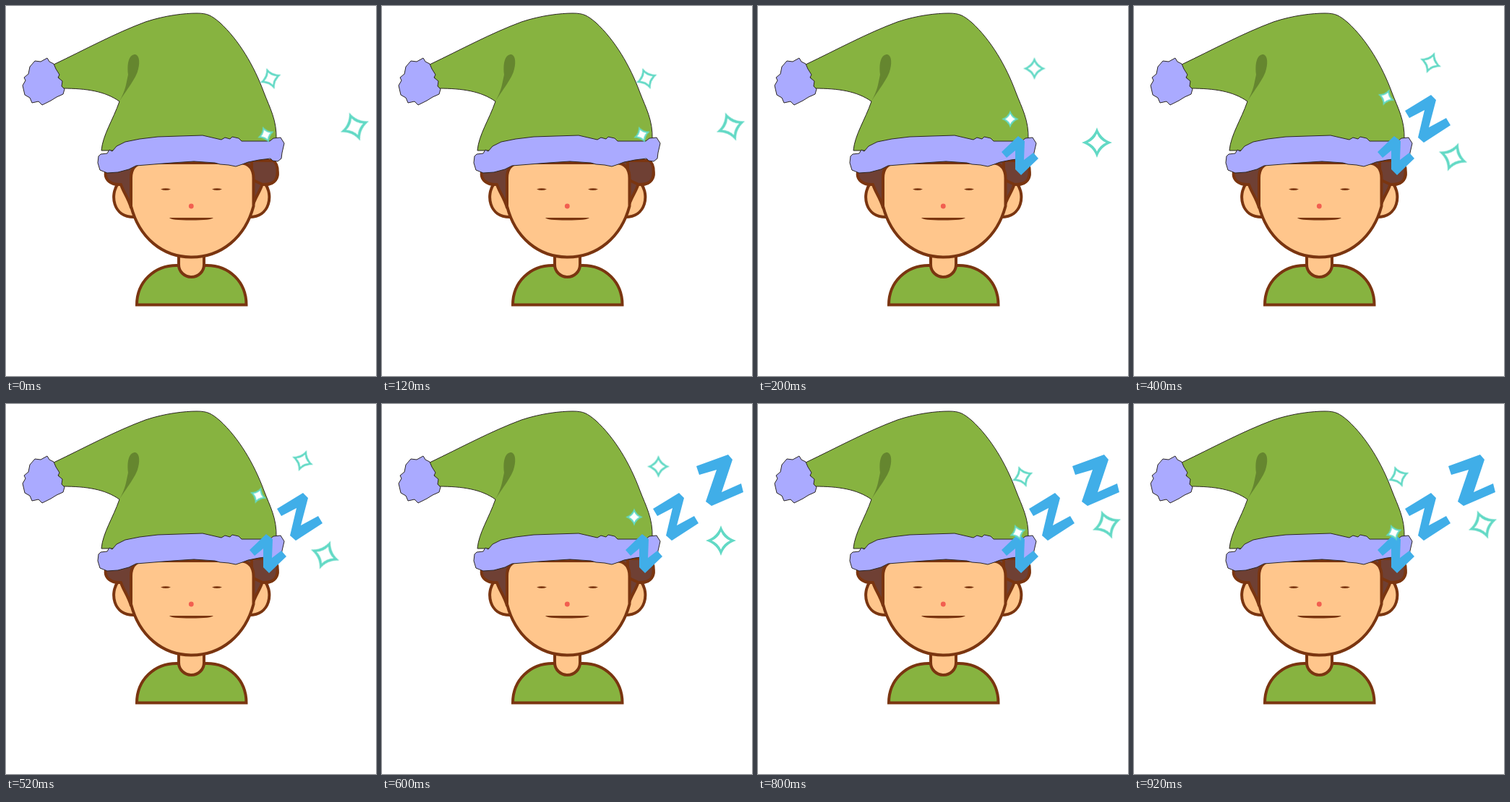
An HTML page that plays this animation: 512x512 px, repeating every 1 s.

```html
<!DOCTYPE html>
<html lang="en">
<head>
<meta charset="utf-8">
<title>Sleepy elf</title>
<style>
  html, body { margin: 0; width: 100%; height: 100%; overflow: hidden; background: #fff; }
  svg { display: block; width: 100vw; height: 100vh; }
  .line { stroke: #7a3510; stroke-width: 4; stroke-linejoin: round; }
  .skin { fill: #ffc68c; }
  .hair { fill: #6f4034; }
  .green { fill: #87b340; }
  .fur { fill: #aaaaff; }
  .thin { stroke: #2b2622; stroke-width: 1; stroke-linejoin: round; }
  .ink { fill: #7a3510; }
  .zed { fill: #40aee8; }
</style>
</head>
<body>
<svg id="stage" viewBox="0 0 512 512" xmlns="http://www.w3.org/2000/svg">
  <defs>
    <g id="side">
      <path class="skin line" d="M155 246C144 260 147 292 177 292V246Z"/>
      <path class="hair line" d="M190 214H150L138 230C136 240 145 248 159 247C162 257 169 265 173 279L190 240Z"/>
    </g>
  </defs>

  <use href="#side"/>
  <use href="#side" transform="matrix(-1 0 0 1 513.5 0)"/>
  <path class="hair line" d="M340 214H370C378 220 377 238 371 243C367 247 361 247 355 247L340 240Z"/>

  <path class="green line" style="stroke-linejoin:miter" d="M181 413.5C181 382 205 359 236 359H278C309 359 332.500 382 332.500 413.500Z"/>
  <path class="skin line" d="M239 342V358a17.500 17 0 0 0 35 0V342Z"/>
  <path class="skin line" d="M173 277V238Q173 219 190 217H325Q342.500 219 342.500 238V277C331 320 298 347.500 257 347.500S184 320 173 277Z"/>

  <path class="ink" d="M214 253.500Q221 251 228 253.500Q221 256.500 214 253.500ZM285 253.500Q292 251 299 253.500Q292 256.500 285 253.500Z"/>
  <path class="ink" d="M226 293H287Q284 296.500 256 296.500T226 293Z"/>
  <circle cx="256.300" cy="277" r="3.400" fill="#f25f50"/>

  <path class="green thin" d="M66 81C110 60 150 38 193 22C220 13 247 10 264 10C279 10 284 13 296 23C322 47 343 82 357 120C365 141 375 158 374 185V200H132C134 178 148 158 157 132C137 118 112 114 78 114Z"/>
  <path fill="#65862f" d="M156.500 132.500C166 116 166 108 169 95C167 77 171 67 179 67C186 69 185 82 182 91C178 102 170 112 156.500 132.500Z"/>
  <path class="fur thin" d="M128 208L131 205L140 204L143 199L147 201L153 194L165 188L185 184L210 181L240 180L272 179L285 182L298 185L303 182L310 184L313 181L322 183L326 187L345 187L365 187L370 183L380 182L385 190L382 203L381 211L376 215L369 214L366 211L350 213L335 216L327 219L318 222L308 220L296 219L289 217L260 215L230 217L205 219L180 221L170 226L155 230L140 231L130 227L127 217Z"/>
  <path class="fur thin" d="M57 72L60 77L66 80L69 87L74 95L72 99L78 104L77 111L81 115L79 122L70 126L62 131L50 137L45 132L36 134L33 127L26 123L23 110L27 103L25 99L31 94L33 84L40 76L48 77Z"/>

  <path class="zed" d="M337 202L360 180L369 187L368 213L381 203L388 211L364 234L356 226L356 200L344 210Z"/>
  <path class="zed" d="M375 145L411 123L418 130L408 168L432 155L438 165L401 189L393 182L402 144L381 155Z"/>
  <path class="zed" d="M435 86L479 70L485 77L470 122L497 110L500 122L456 141L448 135L463 91L439 98Z"/>
</svg>
<script>
const NS = 'http://www.w3.org/2000/svg';
const stage = document.getElementById('stage');
const LOOP = 1000, STEPS = 5;
const START = 0;

// Radius, then x, y at the right, middle and left ends of the swing
const stars = [
  { r: 15.5, at: [[366, 100.5], [382.5, 86.5], [410.5, 78.5]] },
  { r: 12, at: [[359.5, 178], [349, 156.5], [349, 126.5]] },
  { r: 21, at: [[482.5, 167], [469, 189], [441.5, 209]] }
];
const turn = [-21, 0, 21];
const swing = [0, 1, 2, 1, 0];

function starPath(r, k) {
  const c = r * k;
  return `M0 ${-r}Q${c} ${-c} ${r} 0Q${c} ${c} 0 ${r}Q${-c} ${c} ${-r} 0Q${-c} ${-c} 0 ${-r}Z`;
}

function addPath(parent, d, fill) {
  const p = document.createElementNS(NS, 'path');
  p.setAttribute('d', d);
  p.setAttribute('fill', fill);
  parent.append(p);
}

// Plays one value per step, with hard changes between them
function play(el, prop, values) {
  const frames = [...values, values[STEPS - 1]].map((v, i) => ({
    [prop]: v, offset: i / STEPS, easing: 'steps(1, end)'
  }));
  el.animate(frames, { duration: LOOP, iterations: Infinity }).startTime = START;
}

for (const { r, at } of stars) {
  const g = document.createElementNS(NS, 'g');
  addPath(g, starPath(r, 0.24), '#62d9c5');
  addPath(g, starPath(r * 0.6, 0.3), '#fff');
  stage.append(g);
  play(g, 'transform', swing.map(i =>
    `translate(${at[i][0]}px, ${at[i][1]}px) rotate(${turn[i]}deg)`));
}

document.querySelectorAll('.zed').forEach((z, n) =>
  play(z, 'opacity', swing.map((_, i) => i > n ? 1 : 0)));
</script>
</body>
</html>
```
